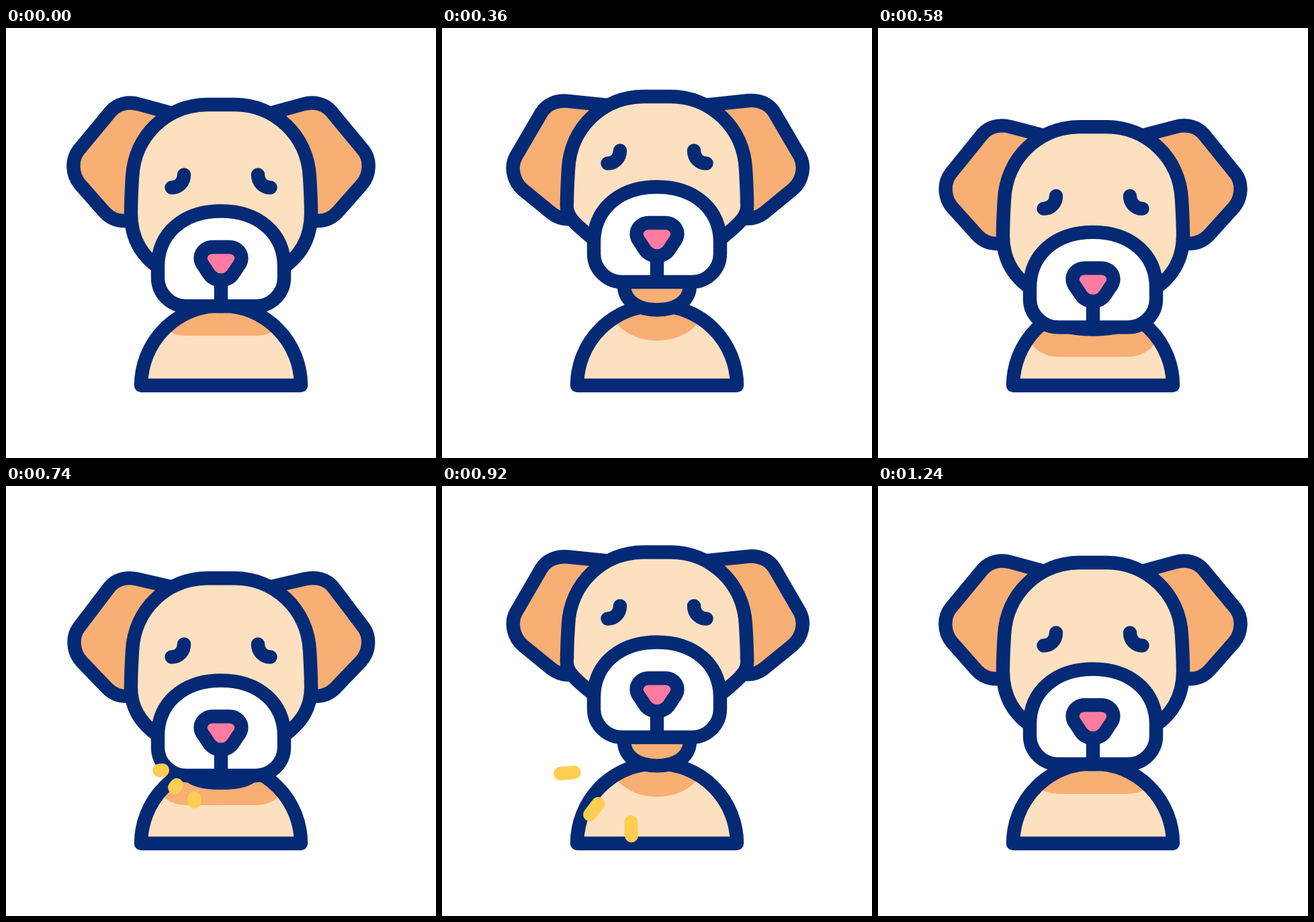
These frames come from a looping animation (640 by 640 pixels, 2.4 s). An HTML page:

```html
<!DOCTYPE html>
<html lang="en">
<head>
<meta charset="utf-8">
<title>Barking dog</title>
<style>
  html, body { margin: 0; height: 100%; overflow: hidden; background: #fff; }
  svg { display: block; width: 100%; height: 100%; }
  .line { stroke: #042a76; stroke-width: 20.4; stroke-linejoin: round; }
  .cap { stroke-linecap: round; fill: none; }
  .cream { fill: #fde0bf; }
  .tan { fill: #f7af74; }
  .shade { stroke: #f7af74; stroke-width: 20; }
  .spark { stroke: #ffcd51; stroke-width: 20; }
</style>
</head>
<body>
<svg viewBox="0 0 640 640">
  <defs>
    <path id="torso" d="M201 532A119 119 0 0 1 439 532Z"/>
    <clipPath id="inside"><use href="#torso"/></clipPath>
    <path id="ear" d="M262 131L198 113.5C182 109 166 112.5 156 124L108 182C97 196 98 218 110 232.500L147 274.500C156 284 166 287.500 178 287L200 282Z"/>
    <path id="eye" d="M265 218.500C265 229.500 257 237.500 246.500 237.500"/>
    <path id="snout"/>
  </defs>
  <use href="#torso" class="cream"/>
  <g clip-path="url(#inside)" class="tan">
    <use id="snoutShade" href="#snout" class="shade"/>
    <path id="throatShade"/>
  </g>
  <use href="#torso" class="line" fill="none"/>
  <path id="throat" class="line tan"/>
  <g id="head" class="line">
    <use id="earL" href="#ear" class="tan"/>
    <use id="earR" href="#ear" class="tan"/>
    <path id="skull" class="cream"/>
  </g>
  <g id="face" class="line">
    <use href="#eye" class="cap"/>
    <use href="#eye" class="cap" transform="matrix(-1 0 0 1 640 0)"/>
    <use href="#snout" fill="#fff"/>
    <path d="M320 376V414"/>
    <path id="nose" fill="#ff7ba0"/>
  </g>
  <g id="sparks" class="spark cap"></g>
</svg>
<script>
const $ = id => document.getElementById(id);
const set = (el, name, value) => el.setAttribute(name, value);
const shift = (el, y) => set(el, "transform", `translate(0 ${y})`);

// Closed shape from its left half, mirrored about x = 320
function mirrored(pts) {
  const other = pts.map(([x, y]) => [640 - x, y]).reverse();
  const run = p => p[0] + "C" + p.slice(1).join(" ");
  return "M" + run(pts) + "L" + run(other) + "Z";
}

const ease = u => {
  u = Math.min(1, Math.max(0, u));
  return u * u * (3 - 2 * u);
};

// Key times with the heights of the head and of the face
const keys = [[0, 0, 0], [360, -12, -36], [640, 39.2, 40.4], [920, -15.5, -40], [1240, 0, 0]];
function keyed(t, col) {
  const i = keys.findIndex(k => t < k[0]);
  if (i < 0) return 0;
  const a = keys[i - 1], b = keys[i];
  return a[col] + (b[col] - a[col]) * ease((t - a[0]) / (b[0] - a[0]));
}

set($("snout"), "d", mirrored([[320, 272.5],
  [265, 272.5], [226, 305], [226, 355],
  [226, 360], [226, 366], [226, 372],
  [226, 395], [245, 414], [268, 414]]));
set($("nose"), "d", mirrored([[308, 326],
  [292, 326], [284, 342], [294, 354],
  [297, 358], [299, 362], [302, 366],
  [306, 372], [313, 375.5], [320, 375.5]]));

const rays = [[233, 423, 176, 428], [254, 445, 220, 489], [280, 465, 282, 520.5]];
const barks = [0, 700];

function sparks(t) {
  const start = t >= barks[1] ? barks[1] : barks[0];
  const head = ease((t - start) / 220), tail = ease((t - start - 90) / 220);
  if (head <= tail) return "";
  return rays.map(([x, y, x2, y2]) => {
    const at = u => `${x + (x2 - x) * u} ${y + (y2 - y) * u}`;
    return `<path d="M${at(tail)}L${at(head)}"/>`;
  }).join("");
}

function draw(t) {
  const head = keyed(t, 1), face = keyed(t, 2);
  const tilt = head - face, k = tilt / 24.5;
  shift($("head"), head);
  shift($("face"), face);
  shift($("snoutShade"), face + 34);
  set($("earL"), "transform", `rotate(${-9.5 * k} 238 180)`);
  set($("earR"), "transform", `rotate(${9.5 * k} 407 195) matrix(-1 0 0 1 640 0)`);
  set($("skull"), "d", mirrored([[300, 114],
    [240, 114], [191, 160], [188, 222],
    [187, 240], [186, 255], [186, 272],
    [185 - k, 308 - 17 * k], [198 - 5 * k, 340 - 40 * k], [236, 362 - 28 * k]]));

  const low = 414 + head + 0.73 * tilt, h = 10 + tilt;
  set($("throat"), "d", mirrored([[270, low - h - 20],
    [270, low - h - 14], [270, low - h - 7], [271, low - h],
    [273, low - 0.3 * h], [295, low], [320, low]]));

  const base = head + 433.7 + 1.81 * tilt, s = 10 + 1.3 * tilt;
  set($("throatShade"), "d", mirrored([[250, base - s],
    [262, base - 0.33 * s], [290, base], [320, base]]));

  $("sparks").innerHTML = sparks(t);
}

function tick() {
  draw(Math.floor(performance.now() % 2400 / 20) * 20);
  requestAnimationFrame(tick);
}
tick();
</script>
</body>
</html>
```
